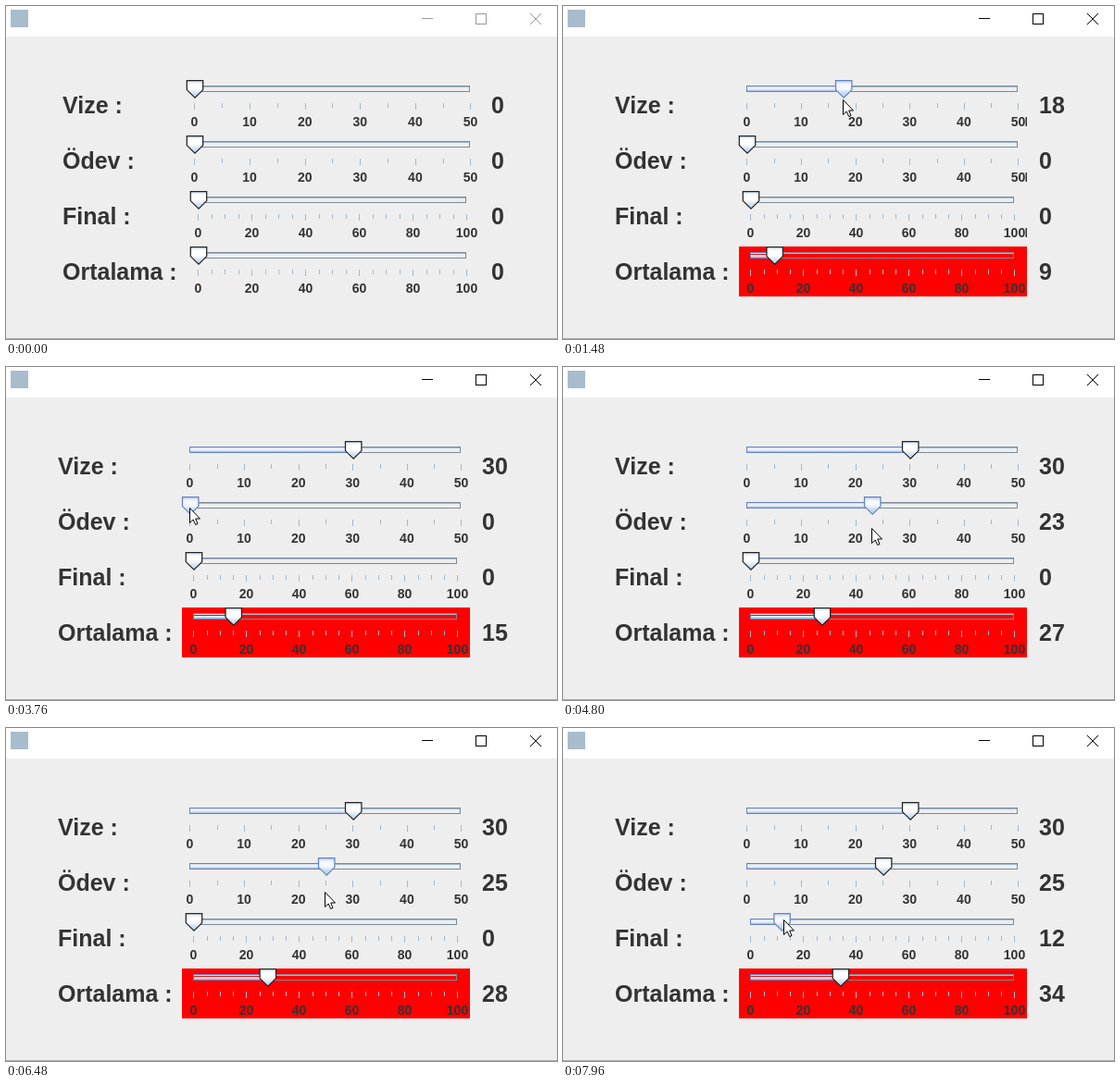
Animation of 595 by 360 pixels, one loop 8 s. Source, as an HTML page with a canvas:

```html
<!DOCTYPE html>
<html lang="tr">
<head>
<meta charset="utf-8">
<title>Not ortalaması</title>
<style>
  html, body { margin: 0; width: 100%; height: 100%; overflow: hidden; background: #eee; }
  canvas { display: block; }
</style>
</head>
<body>
<canvas id="stage" width="595" height="360"></canvas>
<script>
const ctx = document.getElementById('stage').getContext('2d');
const LOOP = 8000, STEP = 80, ACTIVE = 1200;
const FONT = '"Liberation Sans", Arial, sans-serif';
const INK = '#333', BLUE = '#6382bf', GRAY = '#7a8a99', TICK = '#a3b8cc';
const NAMES = ['Vize :', 'Ödev :', 'Final :', 'Ortalama :'];
const MAX = [50, 50, 100, 100];

// Pointer glides: start, end, target x, target y
const ENTRY = [520, 380];
const GLIDES = [
  [40, 920, 204, 94], [920, 1000, 203, 90],
  [1160, 1960, 358, 107], [2200, 2440, 374, 111],
  [2800, 2880, 363, 114], [2920, 3560, 198, 152],
  [3760, 5160, 343, 176], [5400, 5560, 339, 177], [5880, 5960, 345, 177],
  [6400, 6480, 344, 177], [6480, 6880, 358, 269], [6880, 7280, 231, 231],
  [7280, 7560, 209, 212], [7640, 7960, 238, 207]
];

// When each slider is held, and the thumb's distance from the pointer
const DRAGS = [
  { from: ACTIVE, to: 2800, grip: 1.2 },
  { from: 3760, to: 6400, grip: 1.2 },
  { from: 7720, to: LOOP, grip: -1.4 }
];

// The form narrows once a value needs two digits
const layout = (label, value, left, right) => ({
  label, value, left, right,
  ranges: MAX.map(m => m === 50 ? [left + 9, right - 9] : [left + 13, right - 13])
});
const WIDE = layout(61, 524, 195, 511);
const NARROW = layout(56, 514, 190, 501);

const easeOut = k => 1 - (1 - k) * (1 - k);

function pointerAt(t) {
  let [x, y] = ENTRY;
  for (const [from, to, tx, ty] of GLIDES) {
    if (t < from) break;
    const snapped = Math.floor((t - from) / STEP) * STEP;
    const k = t >= to ? 1 : easeOut(snapped / (to - from));
    x += (tx - x) * k;
    y += (ty - y) * k;
  }
  return { x: Math.round(x), y: Math.round(y) };
}

const toValue = (x, [a, b], max) => Math.max(0, Math.round((x - a) / (b - a) * max));
const toX = (v, [a, b], max) => a + (b - a) * v / max;

function stateAt(t) {
  const held = DRAGS.map(d => t < d.from ? 0 : pointerAt(Math.min(t, d.to)).x + d.grip);
  const lay = toValue(held[0], WIDE.ranges[0], 50) < 10 ? WIDE : NARROW;
  const values = held.map((x, i) => toValue(x, lay.ranges[i], MAX[i]));
  const xs = held.map((x, i) => Math.max(x, lay.ranges[i][0]));
  const mean = Math.round(values.reduce((a, b) => a + b) / 2);
  values.push(mean);
  xs.push(toX(mean, lay.ranges[3], 100));
  return {
    xs, values, lay,
    focus: DRAGS.filter(d => t >= d.from).length - 1,
    stale: lay === NARROW && t < 1760
  };
}

function rect(x, y, w, h, color) {
  ctx.fillStyle = color;
  ctx.fillRect(x, y, w, h);
}

function text(s, x, y, size, align = 'left') {
  ctx.font = `bold ${size}px ${FONT}`;
  ctx.textAlign = align;
  ctx.fillStyle = INK;
  ctx.fillText(s, x, y);
}

function shape(points, fill, stroke, width) {
  ctx.beginPath();
  points.forEach(([x, y]) => ctx.lineTo(x, y));
  ctx.closePath();
  ctx.fillStyle = fill;
  ctx.fill();
  ctx.strokeStyle = stroke;
  ctx.lineWidth = width;
  ctx.stroke();
}

function gradient(y0, y1, ...colors) {
  const g = ctx.createLinearGradient(0, y0, 0, y1);
  colors.forEach((c, i) => g.addColorStop(i / (colors.length - 1), c));
  return g;
}

function titleBar(active) {
  rect(0, 0, 595, 33, '#fff');
  rect(5, 4, 19, 19, '#a9bccb');
  const color = active ? '#000' : '#999';
  rect(449, 13, 12, 1, color);
  ctx.strokeStyle = color;
  ctx.lineWidth = 1;
  ctx.strokeRect(507.5, 8.5, 11, 11);
  ctx.beginPath();
  ctx.moveTo(566, 8);
  ctx.lineTo(578, 20);
  ctx.moveTo(578, 8);
  ctx.lineTo(566, 20);
  ctx.stroke();
}

function thumb(x, y, focused) {
  const l = x - 8.7, r = x + 8.7;
  const fill = focused
    ? gradient(y, y + 19, '#b8cbf0', '#f4f8ff', '#f4f8ff', '#c8d9f4', '#b8cfe5')
    : gradient(y, y + 19, '#c8ddf2', '#fff', '#fff', '#d2e3f4', '#b8cfe5');
  shape([[l, y + 0.6], [r, y + 0.6], [r, y + 10.6], [x, y + 19.2], [l, y + 10.6]],
    fill, focused ? BLUE : '#222', 1.25);
}

function track([x0, x1], at, y, back) {
  const l = x0 - 1, r = x1 - 1, w = Math.round(at) - l;
  ctx.lineWidth = 1;
  ctx.strokeStyle = GRAY;
  ctx.strokeRect(l + 0.5, y + 0.5, r - l - 1, 6);
  rect(l + 1, y + 1, r - l - 2, 1, TICK);
  if (w < 3) return;
  rect(l + 1, y + 1, w, 1, '#d2e2ef');
  rect(l + 1, y + 2, w, 1, back);
  rect(l + 1, y + 3, w, 3, gradient(y + 3, y + 6, '#fff', '#a3b8e0'));
  ctx.strokeStyle = BLUE;
  ctx.strokeRect(l + 0.5, y + 0.5, w, 6);
}

function slider(i, { lay, xs, values, focus, stale }) {
  const top = 80 + i * 60, max = MAX[i], range = lay.ranges[i];
  const back = i === 3 && values[3] > 0 ? '#f00' : '#eee';
  rect(lay.left, top, lay.right - lay.left, 54, back);
  track(range, xs[i], top + 6, back);
  for (let v = 0; v <= max; v += 5) {
    const x = toX(v, range, max), major = v % (max / 5) === 0;
    rect(Math.ceil(x - 1), top + 25, 1, major ? 7 : 5, TICK);
    if (major) text(v, x - 0.5, top + 50, 14, 'center');
  }
  if (stale && i < 3) rect(499.5, top + 40, 1.5, 10, INK);
  thumb(xs[i], top, focus === i);
}

function pointer({ x, y }) {
  const arrow = [[0, 0], [0, 16], [3.7, 12.5], [6.2, 18], [8.5, 17], [6.2, 11.5], [11, 11.5]];
  shape(arrow.map(([a, b]) => [x + a + 0.5, y + b + 0.5]), '#fff', '#000', 1);
}

function draw(t) {
  const s = stateAt(t);
  rect(0, 0, 595, 360, '#eee');
  titleBar(t >= ACTIVE);
  rect(0, 359, 595, 1, '#b0b0b0');
  NAMES.forEach((name, i) => {
    const base = 116 + i * 60;
    slider(i, s);
    text(name, s.lay.label, base, 25);
    text(s.values[i], s.lay.value, base, 25);
  });
  pointer(pointerAt(t));
}

const start = performance.now();
function tick() {
  draw((performance.now() - start) % LOOP);
  requestAnimationFrame(tick);
}
tick();
</script>
</body>
</html>
```
